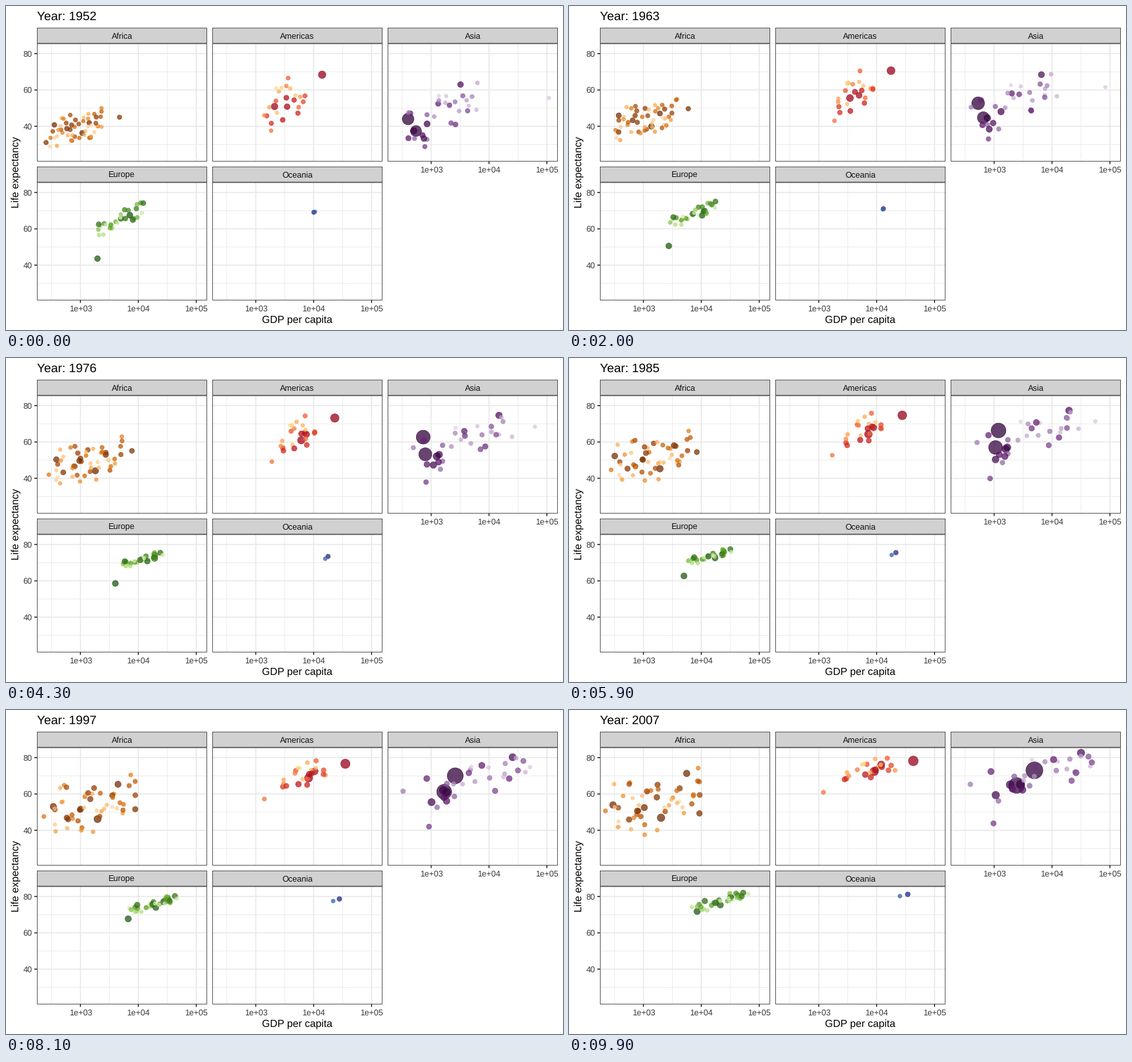
Recreate the animation shown at these times as a matplotlib script. Size 864 px wide and 504 px high, loop 10 s.

```python
import numpy as np
import matplotlib.pyplot as plt
from matplotlib.animation import FuncAnimation
from matplotlib.colors import LinearSegmentedColormap, to_rgb
from matplotlib.patches import Rectangle

plt.rcParams.update({"font.family": "Liberation Sans", "text.hinting": "none",
                     "path.snap": False})

W, H, FRAMES = 864, 504, 100
FIRST, MIDDLE, LAST = KNOTS = 1952, 1978, 2007
PW, PH, STRIP = 264, 183.4, 24.6
X_MIN, X_MAX = 2.2487, 5.1887
Y_MIN, Y_MAX = 20.649, 85.553


def tone(color):
    """Slightly deeper display gamma."""
    return tuple(np.array(to_rgb(color)) ** 1.22)


EDGE, GRID, STRIP_FILL = tone("#333333"), tone("#ebebeb"), tone("#d9d9d9")
TICK_TEXT, STRIP_TEXT = tone("#4d4d4d"), tone("#1a1a1a")
LINE = 1.55

TOP, LOW = 58.4, 274.4
PANELS = {"Africa": (48, TOP), "Americas": (320, TOP), "Asia": (592, TOP),
          "Europe": (48, LOW), "Oceania": (320, LOW)}
RAMPS = {
    "Africa": ["#7F3B08", "#B35806", "#E08214", "#FDB863", "#FEE0B6"],
    "Americas": ["#A50026", "#D73027", "#F46D43", "#FDAE61", "#FEE090"],
    "Asia": ["#40004B", "#762A83", "#9970AB", "#C2A5CF", "#E7D4E8"],
    "Europe": ["#276419", "#4D9221", "#7FBC41", "#B8E186", "#E6F5D0"],
    "Oceania": ["#313695", "#4575B4"],
}

# Number of dots, largest population (millions), its growth over the years.
PEOPLE = {"Africa": (52, 135, 4), "Americas": (25, 120, 2.3),
          "Asia": (33, 300, 2.6), "Europe": (30, 100, 1.5),
          "Oceania": (2, 20, 2.2)}

# Shape of each cloud at the three knots: log income and its spread, life and
# its spread; then how closely life follows income.
CLOUDS = {
    "Africa": ([2.94, 3.12, 3.15], [.27, .36, .42],
               [39, 50, 55], [5, 6.5, 8.5], .45),
    "Americas": ([3.50, 3.75, 3.88], [.20, .18, .24],
                 [53.5, 65, 73.5], [8, 6, 3.2], .6),
    "Asia": ([3.18, 3.60, 3.80], [.36, .46, .50],
             [47, 61, 71], [8.5, 7.5, 6], .7),
    "Europe": ([3.68, 4.10, 4.35], [.24, .21, .25],
               [65, 72.3, 77.5], [4.5, 1.9, 2.7], .85),
}

# Dots that stand out: rank, population, then income and life at each knot.
LEADS = {
    "Africa": [(0, 135, 1077, 36.3, 1900, 44.8, 2014, 46.9),
               (1, 80, 1419, 41.9, 2900, 54, 5581, 71.3),
               (4, 44, 4725, 45, 8100, 56, 9270, 49.3)],
    "Americas": [(0, 301, 13990, 68.4, 24200, 73.6, 42952, 78.2),
                 (1, 190, 2109, 50.9, 6700, 61.8, 9066, 72.4),
                 (2, 109, 3478, 50.8, 8000, 65.4, 11978, 76.2),
                 (14, 8, 1840, 37.6, 1900, 50.2, 1202, 60.9)],
    "Asia": [(0, 1319, 400, 44, 770, 64.3, 4959, 73),
             (1, 1110, 547, 37.4, 820, 54.6, 2452, 64.7),
             (5, 127, 3217, 63, 17000, 75.7, 31656, 82.6),
             (12, 32, 779, 28.8, 820, 38.7, 975, 43.8),
             (31, 2.5, 108382, 55.6, 59000, 69.5, 47307, 77.6)],
    "Europe": [(0, 82, 7144, 67.5, 20800, 72.8, 32170, 79.4),
               (1, 71, 1969, 43.6, 4270, 59.9, 8458, 71.8)],
    "Oceania": [(0, 20, 10040, 69.1, 18600, 73.8, 34435, 81.2),
                (1, 4, 10557, 69.4, 16400, 72.4, 25185, 80.2)],
}

years = np.linspace(FIRST, LAST, FRAMES)
rng = np.random.default_rng(7)


def over_time(values):
    return np.interp(years, KNOTS, values)


def px(panel, log_income):
    return panel[0] + (log_income - X_MIN) / (X_MAX - X_MIN) * PW


def py(panel, life):
    return panel[1] + (Y_MAX - life) / (Y_MAX - Y_MIN) * PH


def radius(people, growth):
    """Dot radius over all frames; area follows population."""
    ends = 2 + 10 * np.sqrt(np.array([people / growth, people]) / 1318.7)
    return 1.067 * np.interp(years, [FIRST, LAST], ends) + 0.35


def wander(n):
    """Even scores near -1.7..1.7 that drift slowly, with five-year steps."""
    def scores():
        return rng.permutation(np.linspace(-1.7, 1.7, n))[:, None]
    s = (years - FIRST) / (LAST - FIRST)
    start, shift = scores(), scores()
    end = 0.85 * start + 0.5 * shift
    steps = np.arange(FIRST, LAST + 1, 5)
    wobble = [np.interp(years, steps, rng.normal(0, 0.1, len(steps)))
              for _ in range(n)]
    return start * (1 - s) + end * s + wobble


def build_tracks():
    """Positions, radii (dot by frame) and colours of all dots."""
    pos, radii, colors = [], [], []

    def add(name, rank, log_income, life, people):
        panel, (n, _, growth) = PANELS[name], PEOPLE[name]
        pos.append(np.column_stack([px(panel, log_income), py(panel, life)]))
        radii.append(radius(people, growth))
        ramp = LinearSegmentedColormap.from_list(name, RAMPS[name])
        colors.append(tone(ramp(rank / (n - 1))[:3]))

    for name, (n, top, _) in PEOPLE.items():
        for rank, people, *path in LEADS[name]:
            add(name, rank, over_time(np.log10(path[::2])),
                over_time(path[1::2]), people)
        if name not in CLOUDS:
            continue
        taken = [lead[0] for lead in LEADS[name]]
        ranks = rng.permutation([r for r in range(n) if r not in taken])
        *knots, tie = CLOUDS[name]
        income, income_sd, life, life_sd = map(over_time, knots)
        wealth, luck = wander(len(ranks)), wander(len(ranks))
        health = tie * wealth + np.sqrt(1 - tie ** 2) * luck
        for rank, u, v in zip(ranks, wealth, health):
            people = top * (1 - rank / n) / (1 + rank / 4)
            add(name, rank, income + income_sd * u, life + life_sd * v, people)
    return np.array(pos), np.array(radii), colors


fig = plt.figure(figsize=(W / 72, H / 72), dpi=72, facecolor="white")
ax = fig.add_axes([0, 0, 1, 1])
ax.set(xlim=(0, W), ylim=(H, 0))
ax.axis("off")


def line(x0, y0, x1, y1, color, width):
    ax.plot([x0, x1], [y0, y1], color=color, lw=width,
            solid_capstyle="butt", zorder=1)


def box(x, y, w, h, fill):
    d = LINE / 4
    ax.add_patch(Rectangle((x + d, y + d), w - 2 * d, h - 2 * d, fc=fill,
                           ec=EDGE, lw=LINE / 2, joinstyle="miter", zorder=3))


def label(x, y, text, size, color="black", **kw):
    return ax.text(x, y, text, size=size, color=color, va="baseline", **kw)


def draw_panel(name, panel):
    x, y = panel
    for major in (False, True):
        width = LINE if major else LINE / 2
        for v in (40, 60, 80) if major else (30, 50, 70):
            line(x, py(panel, v), x + PW, py(panel, v), GRID, width)
        for v in (3, 4, 5) if major else (2.5, 3.5, 4.5):
            line(px(panel, v), y, px(panel, v), y + PH, GRID, width)
    box(x, y, PW, PH, "none")
    box(x, y - STRIP, PW, STRIP, STRIP_FILL)
    label(x + PW / 2, y - 7.7, name, 12.8, STRIP_TEXT, ha="center")
    if x == 48:
        for v in (40, 60, 80):
            ty = py(panel, v)
            line(x - 4, ty, x, ty, EDGE, LINE)
            label(x - 7.2, ty + 4.6, str(v), 12.8, TICK_TEXT, ha="right")
    if name not in ("Africa", "Americas"):
        for v in (3, 4, 5):
            tx, base = px(panel, v), y + PH
            line(tx, base, tx, base + 4, EDGE, LINE)
            label(tx, base + 17, f"1e+0{v}", 12.8, TICK_TEXT, ha="center")


for name, panel in PANELS.items():
    draw_panel(name, panel)
label(452, 493, "GDP per capita", 16, ha="center")
ax.text(19.6, 258, "Life expectancy", size=16, rotation=90,
        rotation_mode="anchor", ha="center", va="baseline")
title = label(48, 22, "", 19.2)

pos, radii, colors = build_tracks()
dots = ax.scatter(*pos[:, 0].T, s=(2 * radii[:, 0]) ** 2, c=colors,
                  alpha=0.74, linewidths=0.7, zorder=2)


def update(i):
    title.set_text(f"Year: {years[i]:.0f}")
    dots.set_offsets(pos[:, i])
    dots.set_sizes((2 * radii[:, i]) ** 2)
    return title, dots


anim = FuncAnimation(fig, update, frames=FRAMES, interval=100,
                     repeat=True, repeat_delay=0, blit=False)
plt.show()
```
